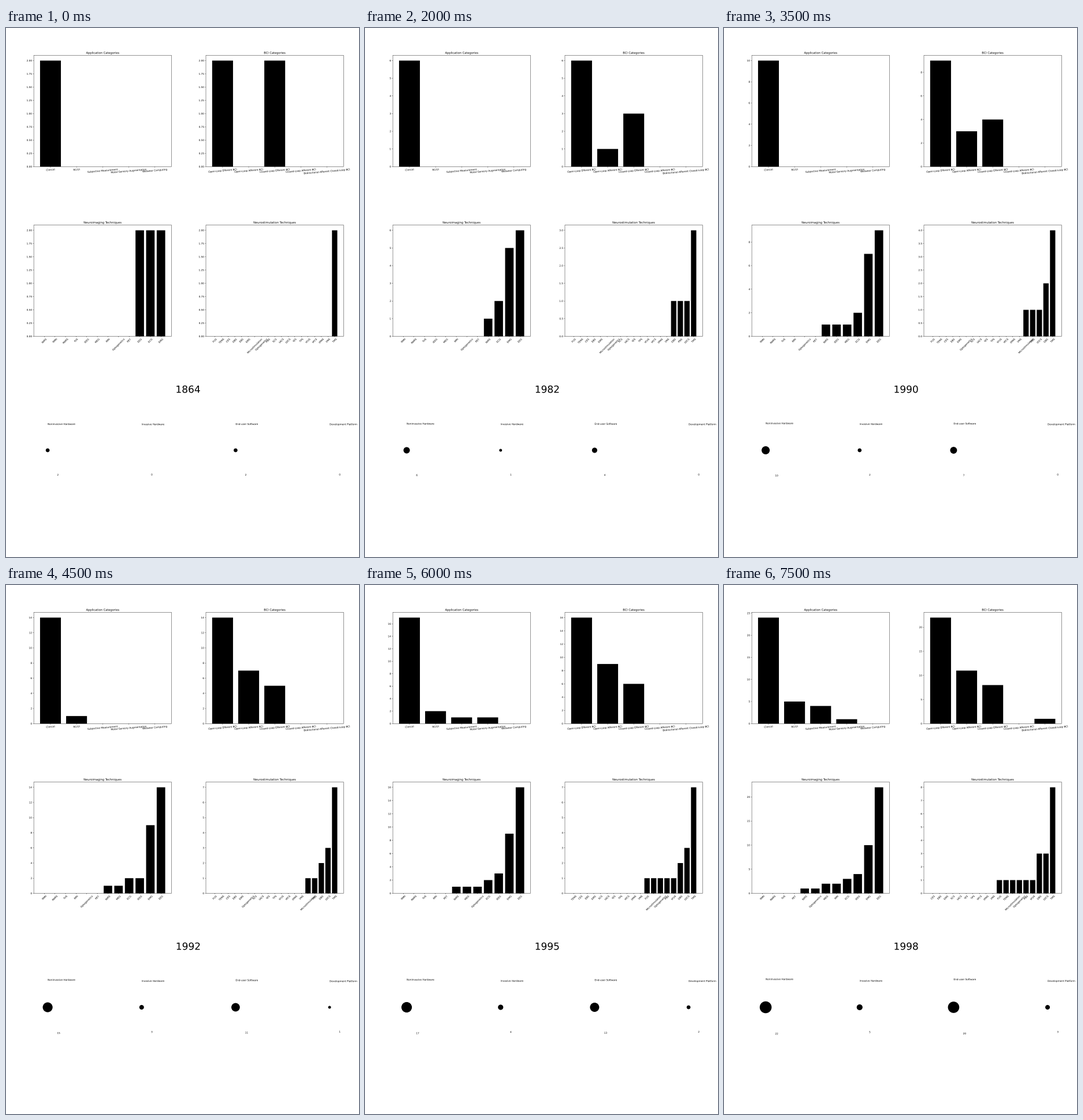
Recreate the animation shown at these times as a matplotlib script. Size 611 by 917 pixels, loop 8 s.

```python
import numpy as np
import matplotlib.pyplot as plt
from matplotlib.animation import FuncAnimation
from matplotlib.patches import Circle, PathPatch, Rectangle
from matplotlib.textpath import TextPath
from matplotlib.ticker import MaxNLocator
from matplotlib.transforms import Affine2D

W, H, DPI = 611, 917, 64
STEPS, STEP_MS = 16, 500
PT = W / 20 / 72            # one point of the 20 inch wide sheet, in pixels
LABEL, TITLE, YEAR = 10 * PT, 12 * PT, 40 * PT
LINE = 0.42
TICK = 3.5 * PT
AX_W, AX_H = 238.3, 193.0

plt.rcParams["font.family"] = "DejaVu Sans"


def rise(*at):
    """Running count that goes up by one at each listed step."""
    return [sum(a <= k for a in at) for k in range(STEPS)]


years = [1864, 1976, 1978, 1980, 1982, 1985, 1988, *range(1990, 1999)]
efferent = [2, 3, 4, 5, 6, 7, 8, 9, 11, 14, 15, 15, 16, 18, 20, 22]
none = rise()

applications = {
    "Clinical": [2, 3, 4, 5, 6, 7, 9, 10, 12, 14, 15, 16, 17, 19, 21, 24],
    "RC/UI": rise(9, 11, 13, 14, 15),
    "Subjective Measurement": rise(11, 13, 14, 15),
    "Motor-Sensory Augmentation": rise(10),
    "Wetwear Computing": none,
}
interfaces = {
    "Open-Loop Efferent BCI": efferent,
    "Open-Loop Afferent BCI": rise(2, 5, 7, 8, 8, 9, 9, 10, 12, 13, 14),
    "Closed-Loop Efferent BCI": rise(0, 0, 2, 6, 9, 11, 13, 15),
    "Closed-Loop Afferent BCI": none,
    "Bidirectional Afferent Closed-Loop BCI": rise(15),
}
imaging = {
    "EEG": efferent, "ECG": rise(0, 0, 15),
    "EMG": rise(0, 0, 2, 3, 4, 6, 7, 8, 9, 14),
    "NIRS": rise(2), "fMRI": none, "fNIRS": none, "fUS": none,
    "iEEG": rise(7, 9, 11, 14), "MEG": rise(6, 15), "MRI": rise(13, 15),
    "Optogenetics": rise(11), "PET": none,
}
stimulation = {
    "FUS": rise(11), "TENS": rise(14), "CES": none, "DBS": rise(1, 7, 14),
    "EBS": none, "EMS": none, "Microstimulation": rise(7),
    "Optogenetics": rise(11), "PNS": rise(1), "SCS": none, "tACS": none,
    "tDCS": rise(2, 8, 9), "tES": none, "TPS": none, "tFUS": rise(11),
    "tPCS": none, "tRNS": none, "VNS": none,
    "TMS": rise(0, 0, 2, 5, 8, 9, 9, 13),
}
products = {
    "Noninvasive Hardware":
        [2, 3, 4, 5, 6, 7, 9, 10, 12, 15, 15, 16, 17, 19, 21, 22],
    "Invasive Hardware": rise(1, 7, 9, 11, 14),
    "End-user Software":
        [2, 2, 2, 3, 4, 5, 6, 7, 9, 11, 12, 12, 13, 16, 18, 20],
    "Development Platform": rise(9, 10, 14),
}

# title, data, left, top, label angle, sorted by count
charts = [
    ("Application Categories", applications, 48.1, 47.3, 5, False),
    ("BCI Categories", interfaces, 346.0, 47.3, 5, False),
    ("Neuroimaging Techniques", imaging, 48.1, 341.5, 45, True),
    ("Neurostimulation Techniques", stimulation, 346.0, 341.5, 45, True),
]

fig = plt.figure(figsize=(W / DPI, H / DPI), dpi=DPI, facecolor="white")
ax = fig.add_axes([0, 0, 1, 1])


def outline(s, size):
    path = TextPath((0, 0), s, size=size)
    box = path.get_extents()
    return path, box.x1 + box.x0


def put(path, transform):
    ax.add_patch(PathPatch(transform.transform_path(path), fc="black", lw=0))


def text(x, y, s, size=LABEL, align=0.0):
    """Text on baseline y; align 0, 0.5 or 1 for left, centre or right."""
    path, width = outline(s, size)
    put(path, Affine2D().scale(1, -1).translate(x - align * width, y))


def slanted(x, top, s, angle):
    """Rotated text whose bounding box hangs centred below (x, top)."""
    path, width = outline(s, LABEL)
    drop, height = 0.21 * LABEL, 0.97 * LABEL
    a = np.radians(angle)
    half = (width * np.sin(a) + height * np.cos(a)) / 2
    put(path, Affine2D().translate(-width / 2, drop - height / 2)
        .rotate(a).scale(1, -1).translate(x, top + half))


def rect(x, y, w, h, **style):
    ax.add_patch(Rectangle((x, y), w, h, snap=False, **style))


def line(xs, ys):
    ax.plot(xs, ys, color="black", lw=LINE * 72 / DPI, snap=False,
            solid_capstyle="butt")


def value_ticks(limit):
    locator = MaxNLocator(nbins=9, steps=[1, 2, 2.5, 5, 10])
    ticks = [t for t in locator.tick_values(0, limit) if 0 <= t <= limit]
    step = ticks[1] - ticks[0]
    digits = next(d for d in range(3) if abs(step - round(step, d)) < 1e-9)
    return [(t, f"{t:.{digits}f}") for t in ticks]


def bar_chart(k, title, data, left, top, angle, by_count):
    bars = [(name, counts[k]) for name, counts in data.items()]
    if by_count:
        bars.sort(key=lambda bar: bar[1])
    base = top + AX_H
    limit = 1.05 * max(count for _, count in bars)
    span = len(bars) - 0.2
    unit = AX_W / (1.1 * span)

    for i, (name, count) in enumerate(bars):
        x = left + (0.05 * span + 0.4 + i) * unit
        h = AX_H * count / limit
        if count:
            rect(x - 0.4 * unit, base - h, 0.8 * unit, h, fc="black", lw=0)
        line([x, x], [base, base + TICK])
        slanted(x, base + 2 * TICK, name, angle)

    for value, label in value_ticks(limit):
        y = base - AX_H * value / limit
        line([left - TICK, left], [y, y])
        text(left - 2 * TICK, y + 0.365 * LABEL, label, align=1)

    rect(left, top, AX_W, AX_H, fc="none", ec="black", lw=LINE * 72 / DPI)
    text(left + AX_W / 2, top - 6 * PT, title, TITLE, 0.5)


def draw(k):
    ax.clear()
    ax.set(xlim=(0, W), ylim=(H, 0))
    ax.axis("off")
    for chart in charts:
        bar_chart(k, *chart)
    text(315.5, 632.3, str(years[k]), YEAR, 0.5)
    for i, (name, counts) in enumerate(products.items()):
        x, n = 72.1 + 162.65 * i, counts[k]
        shift = 0.165 * n
        text(x, 688.4 - shift, name)
        text(x + 16.3, 775.65 + shift, str(n))
        if n:
            ax.add_patch(Circle((x, 732), 5 * PT * np.sqrt(n) + 0.75 * PT,
                                fc="black", lw=0))
    return []


anim = FuncAnimation(fig, draw, frames=STEPS, interval=STEP_MS,
                     init_func=lambda: [], repeat=True, repeat_delay=0)
plt.show()
```
